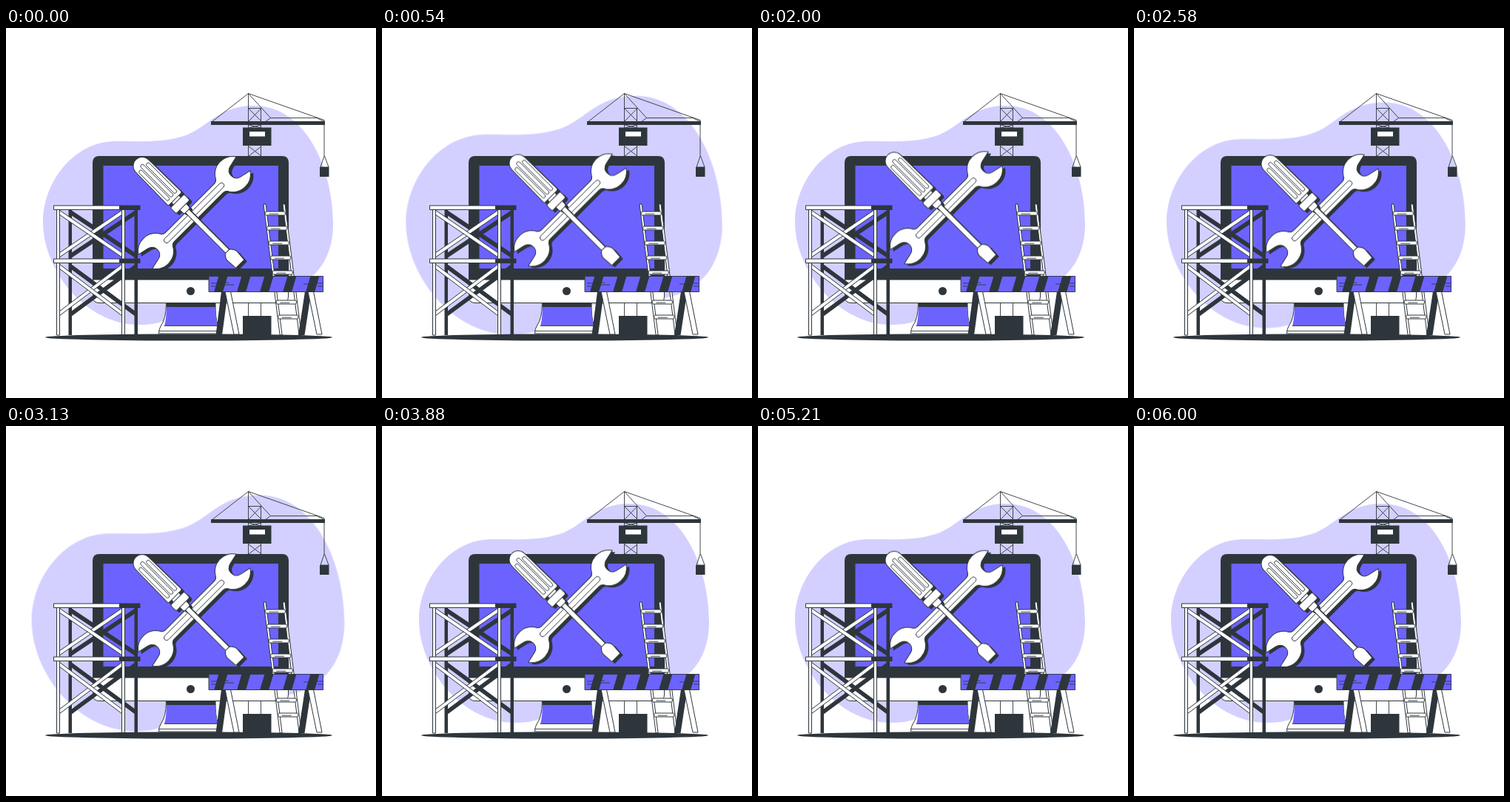
An HTML page for the animation above (6040 ms loop, 500 by 500 pixels).

```html
<!DOCTYPE html>
<html lang="en">
<head>
<meta charset="utf-8">
<title>Under construction</title>
<style>
  html, body { margin: 0; width: 100%; height: 100%; overflow: hidden; background: #fff; }
  svg { display: block; width: 100%; height: 100%; }
  .dark { fill: #2e363c; }
  .main { fill: #6c63ff; }
  .line { fill: none; stroke: #2e363c; stroke-width: .9; }
  .white { fill: #fff; stroke: #2e363c; }
  .edge { stroke: #2e363c; }

  .blob { fill: #d3d0ff; transform-origin: 246px 253px; animation: beat 6.04s linear infinite; }
  .tools { animation: hover 6.04s linear infinite; }

  /* 6 s of motion plus a 40 ms hold */
  @keyframes beat {
    0%, 29.801%, 39.735%, 59.603%, 100% { transform: scale(1); }
    9.934%, 49.669% { transform: scale(1.1); }
  }
  @keyframes hover {
    0%, 49.669%, 99.338%, 100% { transform: translateY(0); }
    24.834%, 74.503% { transform: translateY(-10px); }
  }
</style>
</head>
<body>
<svg viewBox="0 0 500 500">
  <defs>
    <path id="wrench" transform="translate(202.500 301.500) rotate(-45)" d="M-20 13.300L-5 10Q3 8 3 0Q3-8-5-10L-20-13.300A24 24 0 0 1 21-11.600Q23-8.500 27-8.500H120Q124-8.500 126-11.600A24 24 0 0 1 167-13.300L152-10Q144-8 144 0Q144 8 152 10L167 13.300A24 24 0 0 1 126 11.600Q124 8.500 120 8.500H27Q23 8.500 21 11.600A24 24 0 0 1-20 13.300Z"/>
    <g id="driver" transform="translate(184 186.500) rotate(45)">
      <path d="M84-3.500H165V3.500H84Z"/>
      <path d="M163-3.500Q167-9 172-9L187-8V8L172 9Q167 9 163 3.500Z"/>
      <path d="M60-7H70V7H60ZM77-6H83Q86-6 86-3.500V3.500Q86 6 83 6H77Z"/>
      <rect x="67" y="-13" width="11" height="26" rx="2"/>
      <path d="M0-12L61-13Q63-13 63-11V11Q63 13 61 13L0 12A12 12 0 0 1 0-12Z"/>
    </g>
  </defs>

  <path class="blob" d="M50 262C50 208 92 153 148 153C185 153 212 155 240 146C272 136 285 105 335 105C405 105 442 190 442 265C442 300 428 332 395 348C350 368 285 354 250 374C225 390 215 401 180 401C108 401 50 328 50 262Z"/>

  <g id="crane">
    <path class="line" d="M278 127L327.500 88.500L430 124.500V173L425 188H436L430.500 173M327.500 88.500L357.500 121.500H420L430 126.500M357.500 121.500L350 127M327.500 88.500V174M344.500 108.500V174M328 108.500H345L328 126M328 109L345 126M328 131L345 135M345 131L328 135M328 160L345 173M345 160L328 173"/>
    <path class="dark" d="M277 126H431V131H277ZM320 134.500H358.500V159H320ZM424 188H436.500V201H424Z"/>
    <path fill="#fff" d="M329 140H350V146.500H329Z"/>
    <path class="line" d="M327.500 372V390M344.500 372V390"/>
    <path class="dark" d="M320 389H358.500V416H320Z"/>
  </g>

  <g id="monitor">
    <path class="white" d="M216.500 372Q216.500 393 209 403Q206.500 407 206.500 413H291Q291 406 286 400Q283 393 283 372Z"/>
    <path class="main" d="M217 372Q217 393 214 402.500H286.500Q283 393 283 372Z"/>
    <path class="line" d="M214 402.500H287M206.500 409.500H290"/>
    <path class="dark" d="M217 371H283V377H217Z"/>
    <path class="white" d="M117.500 337H381.500V363Q381.500 371.500 373 371.500H126Q117.500 371.500 117.500 363Z"/>
    <path class="dark" d="M117 340.500V182Q117 173 126 173H373Q382 173 382 182V340.500Z"/>
    <path class="main" d="M131.500 186H368V325H131.500Z"/>
    <circle class="dark" cx="249.500" cy="355.500" r="5.500"/>
  </g>

  <g class="tools">
    <use href="#wrench" class="dark" x="4" y="2.500"/>
    <use href="#wrench" class="white"/>
    <rect class="line" x="17" y="-3.500" width="112" height="7" rx="3.500" transform="translate(202.500 301.500) rotate(-45)"/>
    <use href="#driver" class="dark" x="4" y="2.500"/>
    <use href="#driver" class="white"/>
    <g class="line" transform="translate(184 186.500) rotate(45)">
      <rect x="2" y="-9.500" width="56" height="5" rx="2.500"/>
      <rect x="-2" y="-2.500" width="60" height="5" rx="2.500"/>
      <rect x="2" y="4.500" width="56" height="5" rx="2.500"/>
    </g>
  </g>

  <g id="scaffold"></g>
  <g id="ladder"></g>

  <ellipse class="dark" cx="247" cy="418" rx="194" ry="4.500"/>

  <g id="barrier">
    <path class="dark" d="M291 356H300L292 415H283.500ZM404 356H412.500L403.500 415H395Z"/>
    <path class="white" d="M296 356H303.500L315 414H308ZM408 356H415.500L427 414H420Z"/>
    <path class="main" d="M274 335H429V357H274Z"/>
    <path id="stripes" class="dark"/>
    <path class="line" d="M274 335.500H428.500V356.500H274ZM277 345H286M277 349H283M291 347H308M294 344H301M402 346H414M419 345H428M421 349H428"/>
  </g>
</svg>
<script>
  const byId = id => document.getElementById(id);
  const shape = (d, cls) => `<path class="${cls}" d="${d}"/>`;
  const box = (x, y, w, h, cls) => shape(`M${x} ${y}h${w}v${h}h${-w}Z`, cls);

  // Slanted beam with vertical ends
  const beam = (x1, y1, x2, y2, h, cls) =>
    shape(`M${x1} ${y1}L${x2} ${y2}v${h}L${x1} ${y1 + h}Z`, cls);
  const cross = (x1, x2, top, bottom, h, cls) =>
    beam(x1, bottom, x2, top, h, cls) + beam(x1, top, x2, bottom, h, cls);

  const levels = [[246, 304], [319, 383]];
  byId('scaffold').innerHTML =
    box(84.5, 245, 4.5, 170, 'dark') + box(173.5, 245, 4.5, 170, 'dark') +
    levels.map(([a, b]) => cross(88, 175, a, b, 7, 'dark')).join('') +
    levels.map(([a, b]) => cross(72, 157, a, b, 6, 'white')).join('') +
    box(68.5, 245, 4, 170, 'white') + box(156.5, 245, 4, 170, 'white') +
    [240, 312].map(y => box(64.5, y, 89, 5.5, 'white') +
      box(153, y - .5, 28.5, 6.5, 'dark')).join('');

  const lean = y => 348 + (y - 238) * .125;
  const rail = dx => shape(`M${lean(238) + dx} 238h3L${lean(415) + dx + 3} 415h-3Z`, 'white');
  let rungs = '';
  for (let y = 248; y < 400; y += 20) {
    const x = lean(y) + 1;
    rungs += `<rect class="white" x="${x}" y="${y}" width="27" height="5" rx="1.5"/>` +
      shape(`M${x + 5} ${y + 3.2}h13`, 'line');
  }
  byId('ladder').innerHTML = rail(0) + rail(26) + rungs;

  byId('stripes').setAttribute('d',
    [0, 1, 2, 3, 4].map(k => `M${287.5 + k * 31} 335h12l-6.5 22h-12Z`).join(''));
</script>
</body>
</html>
```
